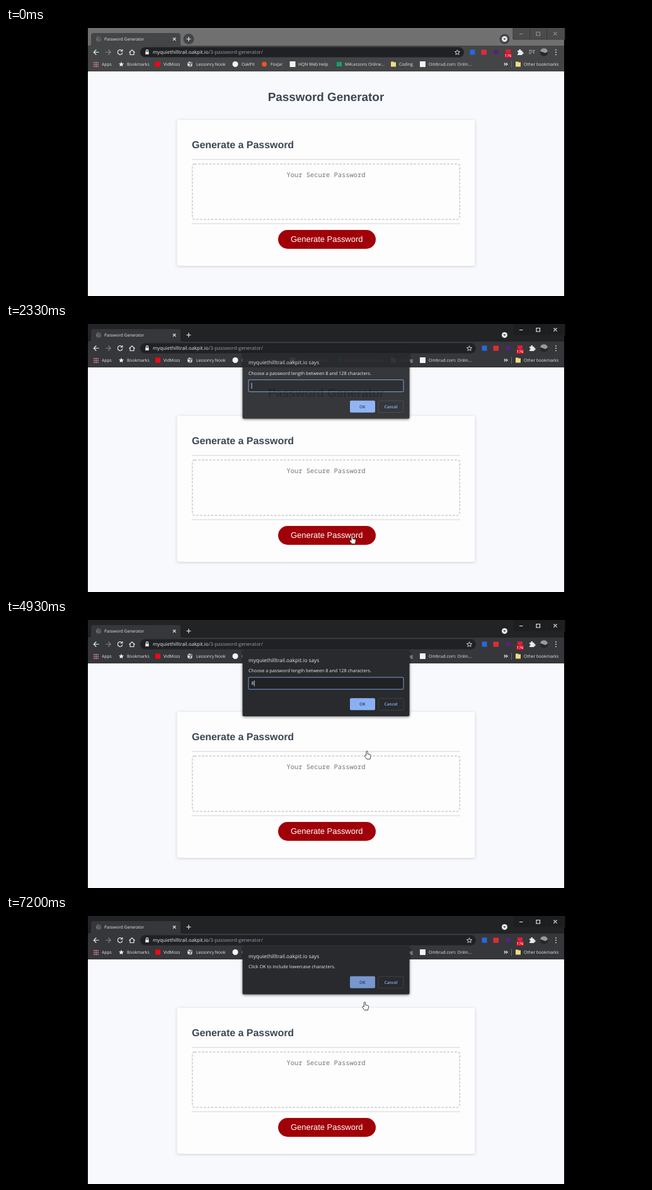
An HTML page that plays this animation: 1016x426 px, repeating every 8000 ms.

```html
<!DOCTYPE html>
<html lang="en">
<head>
<meta charset="utf-8">
<title>Password Generator</title>
<style>
html, body { margin: 0; width: 100%; height: 100%; overflow: hidden; background: #000; }
svg { display: block; width: 1016px; height: 426px; text-rendering: geometricPrecision; }
text { font-family: "Open Sans", "Noto Sans", sans-serif; fill: #e8eaed; }
.line { fill: none; stroke: #e8eaed; stroke-width: 1.2; }
.bookmarks text { font-size: 6.75px; }
.page text { font-family: "Liberation Sans", Arial, sans-serif; font-weight: bold; fill: #3b4754; }
.page .hint { font: 10.42px "Noto Sans Mono", monospace; fill: #757575; }
.page .label { font-size: 12.96px; font-weight: normal; fill: #fff; }
.card { fill: #fdfdfd; filter: drop-shadow(0 1px 2.5px rgba(0, 0, 0, .17)); }
.strip { fill: #707070; }
.bar { fill: #444547; }
.controls { fill: #4b4b4b; stroke: #393939; }
.active .strip { fill: #222325; }
.active .bar { fill: #36373a; }
.active .controls { fill: #1d1e20; stroke: #222325; }
.active .idle { display: none; }
.box { fill: #282a2d; filter: drop-shadow(0 1px 2px rgba(0, 0, 0, .55)); }
.cancel { fill: none; stroke: #3f4246; }
.dialog .button { font-size: 6.6px; font-weight: 600; text-anchor: middle; }
.cursor path { fill: #fff; stroke: #111; stroke-width: .8; stroke-linejoin: round; }
</style>
</head>
<body>
<svg id="stage" viewBox="0 0 1016 426">
  <defs>
    <g id="globe"><circle r="4"/><path d="M-3 -2L0 -1L1 2L-1 3M1 -4L2 -1L4 0" fill="none" stroke="#444" stroke-width="1.2"/></g>
    <path id="star" d="M0 -4L1.2 -1.4L4 -1.2L1.9 .7L2.5 3.5L0 2L-2.5 3.5L-1.9 .7L-4 -1.2L-1.2 -1.4Z"/>
    <path id="folder" d="M-4 -4H0L1 -3H4V4H-4Z" fill="#f4db83"/>
  </defs>
  <rect width="1016" height="426"/>

  <g class="page">
    <rect x="130" y="68" width="756" height="358" fill="#f8f9fc"/>
    <text x="508" y="116" font-size="18.86" text-anchor="middle">Password Generator</text>
    <rect class="card" x="271.5" y="146" width="473" height="232" rx="3"/>
    <text x="295" y="191" font-size="15.95">Generate a Password</text>
    <path d="M295 209H721M295 311H721" stroke="#e2e2e4" stroke-width="1.6"/>
    <rect x="295.8" y="216.2" width="424.5" height="88" rx="3.5" fill="none" stroke="#bfc1c4" stroke-width="1.3" stroke-dasharray="3.54 2.36"/>
    <text class="hint" x="508" y="236.5" text-anchor="middle">Your Secure Password</text>
    <rect x="432" y="321" width="155" height="30" rx="15" fill="#a00007"/>
    <text class="label" x="509.2" y="340.4" text-anchor="middle">Generate Password</text>
  </g>

  <g class="chrome">
    <rect class="strip" x="130" width="756" height="29"/>
    <path class="bar" d="M130 28H132Q135 28 135 25V12Q135 8 139 8H273Q277 8 277 12V25Q277 28 280 28H886V69H130Z"/>
    <use href="#globe" x="147" y="17.5" fill="#6b6d70"/>
    <text x="156" y="20" font-size="6.65">Password Generator</text>
    <path class="line" d="M265 15.3L269.6 19.9M269.6 15.3L265 19.9"/>
    <circle class="idle" cx="290" cy="17.5" r="8.5" fill="#444547"/>
    <path class="line" d="M286.5 17.5H293.5M290 14V21"/>
    <circle class="idle" cx="791.5" cy="17.5" r="8" fill="#444547"/>
    <circle cx="791.5" cy="17.5" r="4.5" fill="#e8eaed"/>
    <path d="M789.3 16.5H793.7L791.5 19Z" fill="#333"/>
    <path class="controls" d="M805 -1H887V18H805ZM831.5 0V18M858.5 0V18"/>
    <path id="glyphs" class="line" d="M815 9.5H820.5M842 6.5H847.5V12H842ZM869.3 6.3L874.7 11.7M874.7 6.3L869.3 11.7"/>

    <path class="line" d="M147.5 38.5H139.5M143.3 34.5L139.3 38.5L143.3 42.5"/>
    <path class="line" opacity=".4" d="M158 38.5H166M162.2 34.5L166.2 38.5L162.2 42.5"/>
    <path class="line" d="M184 36A3.8 3.8 0 1 0 184.8 39.5M184.8 34V37H181.8"/>
    <path class="line" d="M195.5 39L200 34.8L204.5 39M197 38V42.5H203V38"/>
    <rect id="address" x="213" y="30.5" height="16" rx="8" fill="#202124"/>
    <path d="M221.3 37.5H226.7V42H221.3Z" fill="#e8eaed"/>
    <path class="line" d="M222.4 37.5V36.2A1.6 1.6 0 0 1 225.6 36.2V37.5"/>
    <text x="233" y="41.4" font-size="7.83">myquiethilltrail.oakpit.io<tspan fill="#9aa0a6">/3-password-generator/</tspan></text>
    <g id="extensions">
      <use href="#star" x="716.5" y="38.8" class="line" style="stroke-width:.9"/>
      <rect x="736.5" y="34.5" width="8" height="8" fill="#2868dc"/>
      <rect x="754.5" y="34.5" width="8.5" height="8" fill="#d92f38"/>
      <circle cx="778" cy="38.5" r="4" fill="#51247c"/>
      <rect x="793" y="34" width="8" height="8" fill="#cf2638"/>
      <rect x="791" y="39.5" width="12" height="8" rx="1.5" fill="#c8102e"/>
      <text x="797" y="46" font-size="6" font-weight="600" text-anchor="middle">176</text>
      <path d="M812 36H814.3A1.6 1.6 0 1 1 817.3 36H819.5V38.3A1.6 1.6 0 1 1 819.5 41.3V43H812V41A1.5 1.5 0 0 0 812 38Z" fill="#e8eaed"/>
    </g>
    <path class="line idle" style="stroke:#a5a7aa" d="M830 35.5H836M830 38H836M830 40.5H833.5M837.7 41V35.5H840"/>
    <circle cx="854" cy="38.5" r="6.2" fill="#272727"/>
    <path d="M848 37A6.2 6.2 0 0 1 860 37Q857 41 854 39Z" fill="#999"/>
    <path d="M873 34.7V43" stroke="#e8eaed" stroke-width="1.8" stroke-linecap="round" stroke-dasharray="0 3.8"/>

    <g class="bookmarks">
      <g stroke-width="2" stroke-dasharray="2 1">
        <path d="M140 54V62" stroke="#e5604f"/><path d="M143 54V62" stroke="#86a7d8"/><path d="M146 54V62" stroke="#dc624d"/>
      </g>
      <text x="152" y="60">Apps</text>
      <use href="#star" x="183" y="57.7" fill="#e8eaed"/>
      <text x="192" y="60">Bookmarks</text>
      <rect x="237" y="53.5" width="8" height="8" fill="#f00814"/>
      <text x="250" y="60">VidMoss</text>
      <use href="#globe" x="292" y="57.5" fill="#dadce0"/>
      <text x="302" y="60">Lessonry Nook</text>
      <circle cx="364" cy="57.5" r="4.5" fill="#f3f3f3"/>
      <text x="374" y="60">OakPit</text>
      <circle cx="410" cy="57.5" r="4" fill="#e8542c"/>
      <text x="420" y="60">FoxJar</text>
      <rect x="450.5" y="53" width="9" height="9" fill="#f3f3f3"/>
      <text x="464" y="60">HQN Web Help</text>
      <rect x="525" y="54" width="8" height="7" fill="#16a06c"/>
      <text x="538" y="60">M4Lessons Online...</text>
      <use href="#folder" x="615" y="57.5"/>
      <text x="624" y="60">Coding</text>
      <rect x="657" y="53" width="9" height="9" fill="#f3f3f3"/>
      <text x="671" y="60">Ombrud.com: Onlin...</text>
      <path class="line" d="M791 55.5L793 57.5L791 59.5M794 55.5L796 57.5L794 59.5"/>
      <path d="M802.5 52V63" stroke="#66686b"/>
      <use href="#folder" x="813" y="57.5"/>
      <text x="822" y="60">Other bookmarks</text>
    </g>
  </g>

  <g class="dialog" id="dialog">
    <rect class="box" id="box" x="375.5" y="48" width="265" rx="2"/>
    <text x="385" y="66.7" font-size="8.28">myquiethilltrail.oakpit.io says</text>
    <text id="message" x="385" y="83.4" font-size="7.27"></text>
    <g id="field">
      <rect x="385" y="91.2" width="246" height="19" rx="1.5" fill="#202124" stroke="#6788b5" stroke-width="1.2"/>
      <text id="typed" x="389.6" y="103.2" font-size="7.27">8</text>
      <path id="caret" d="M0 96V105.5" stroke="#e8eaed" stroke-width=".8"/>
    </g>
    <g id="buttons">
      <rect id="ok" x="546" y="124.3" width="40" height="19" rx="2"/>
      <text class="button" x="565.8" y="136.2" style="fill:#26344b">OK</text>
      <rect class="cancel" x="591" y="124.7" width="40" height="18.5" rx="2"/>
      <text class="button" x="611" y="136.2" style="fill:#8ab4f8">Cancel</text>
    </g>
  </g>

  <g class="cursor" id="cursor">
    <path id="hand" d="M-1.2 7V1A1.2 1.2 0 0 1 1.2 1V4.4L5.2 5.3Q6.3 5.7 6.2 7.2L5 12.6H-.2L-3.6 8.2Q-4 6.6 -2.6 6.5Z"/>
    <path id="arrow" d="M0 0V9.5L2.2 7.6L3.7 11L5.3 10.3L3.8 7H6.8Z"/>
  </g>
</svg>
<script>
const LOOP = 8000;
const $ = id => document.getElementById(id);
const show = (id, on) => $(id).style.display = on ? "" : "none";
const ramp = (t, from, to) => Math.min(1, Math.max(0, (t - from) / (to - from)));

// Pointer stops: time, x, y
const path = [
  [200, 600, 428], [1000, 556, 344], [1130, 554.5, 342], [1460, 549.3, 337],
  [4000, 549.3, 337], [4800, 573.5, 212], [4930, 573, 208.5],
  [5660, 570, 141], [5730, 570, 141], [6060, 569.5, 137]
];

function pointerAt(t) {
  const i = path.findIndex(stop => stop[0] > t);
  if (i < 1) return (i ? path[path.length - 1] : path[0]).slice(1);
  const [t0, x0, y0] = path[i - 1], [t1, x1, y1] = path[i];
  const p = ramp(t, t0, t1), e = p * p * (3 - 2 * p);
  return [x0 + (x1 - x0) * e, y0 + (y1 - y0) * e];
}

function drawDialog(t) {
  const confirm = t >= 6960;
  const enter = confirm ? ramp(t, 6960, 7190) : ramp(t, 2130, 2400);
  const leave = confirm ? 0 : ramp(t, 6800, 6900);
  $("dialog").setAttribute("opacity", (1 - (1 - enter) ** 2) * (1 - leave));
  $("dialog").setAttribute("transform", `translate(0 ${-10 * (1 - enter)})`);
  $("box").setAttribute("height", confirm ? 76.5 : 105);
  $("message").textContent = confirm
    ? "Click OK to include lowercase characters."
    : "Choose a password length between 8 and 128 characters.";
  $("buttons").setAttribute("transform", `translate(0 ${confirm ? -28.5 : 0})`);
  $("ok").setAttribute("fill", confirm ? "#7896cf" : "#8ab0f4");
  show("field", !confirm);

  const typed = t >= 3460;
  show("typed", typed);
  show("caret", typed ? Math.floor((t - 3460) / 535) % 2 === 0 : t < 2600 || t >= 3200);
  $("caret").setAttribute("transform", `translate(${typed ? 394.3 : 390} 0)`);
}

function draw(now) {
  const t = now % LOOP;
  const active = t >= 2000;
  $("stage").classList.toggle("active", active);
  $("address").setAttribute("width", active ? 533 : 514);
  $("extensions").setAttribute("transform", `translate(${active ? 19 : 0} 0)`);
  $("glyphs").style.stroke = active ? "#f0f0f0" : "#929292";
  drawDialog(t);

  const [x, y] = pointerAt(t);
  const arrow = y > 351 || (y < 153 && t < 6900);
  $("cursor").setAttribute("transform", `translate(${x} ${y})`);
  show("cursor", t >= 200);
  show("arrow", arrow);
  show("hand", !arrow);
  requestAnimationFrame(() => draw(performance.now()));
}
draw(performance.now());
</script>
</body>
</html>
```
